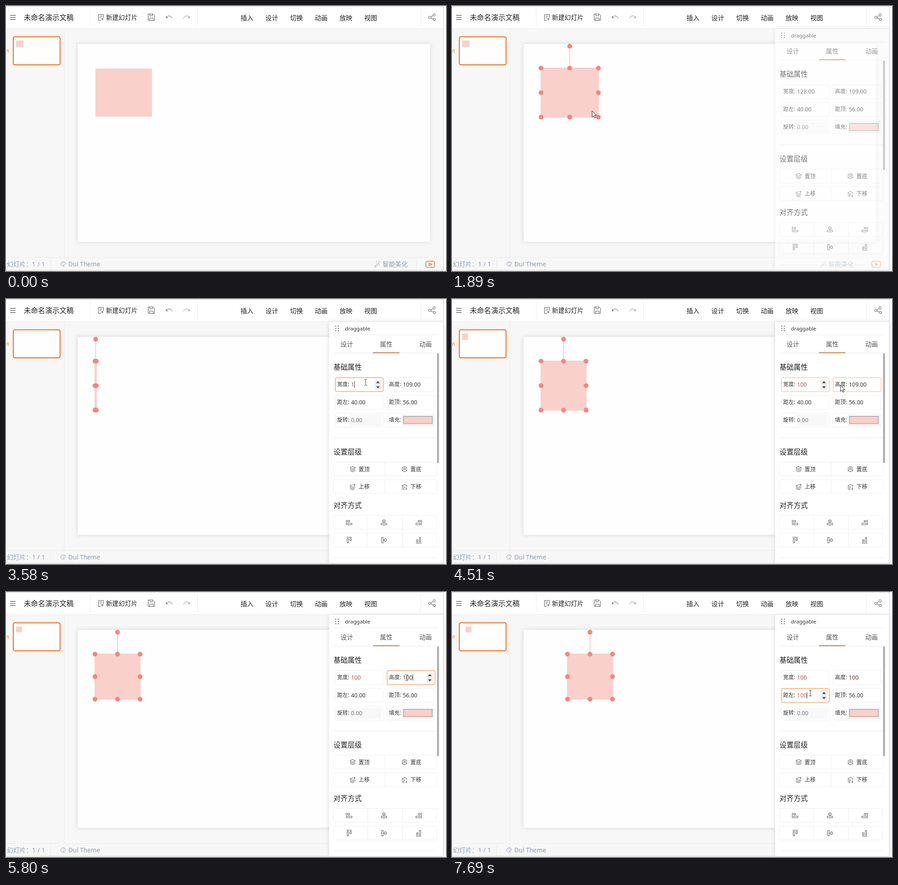
An HTML page that plays this animation: 964 by 581 pixels, repeating every 8000 ms.

```html
<!DOCTYPE html>
<html lang="zh-CN">
<head>
<meta charset="utf-8">
<title>演示文稿</title>
<style>
html, body { margin: 0; width: 100%; height: 100%; overflow: hidden; background: #fff; }
svg { display: block; }
text { font: 14px "Noto Sans", "Noto Sans CJK SC", "Noto Sans CJK", sans-serif; fill: #222; white-space: pre; }
.ic { fill: none; stroke: #555; stroke-width: 1; }
.sep { fill: none; stroke: #ececec; }
.box { fill: #fff; stroke: #efefef; }
.foot { fill: #8f9db3; }
.shade { filter: drop-shadow(0 0 5px rgba(0,0,0,.13)); }
</style>
</head>
<body>
<svg id="stage" width="964" height="581" viewBox="0 0 964 581">
  <rect width="958" height="580" fill="#f7f7f7"/>
  <rect width="958" height="49" fill="#fff"/>
  <path class="sep" d="M0 49.5H958M127.5 50V551M0 551.5H958M184.5 4V45M419.5 4V45M908.5 4V45M97.5 555V577M899.5 555V577"/>

  <g class="ic">
    <path d="M9 20.5H21M9 25H21M9 29.5H21" stroke="#222" stroke-width="1.2"/>
    <path d="M208 31.5H202.500V18.500H213.500V26M205 22H211M205 25H209M208 28.500H214M211 26V31.500" />
    <path d="M311.500 17.500H322L325.500 21V31.500H311.500ZM315 17.500V21.500H321V17.500M314.500 31.500V26.500H322.500V31.500"/>
    <path d="M351 26C354 20 361 20 364 27M351 22V26H355"/>
    <path d="M389 27C392 20 399 20 402 26M402 22V26H398" stroke="#888"/>
    <circle cx="928.500" cy="25" r="2.600"/><circle cx="938" cy="19.500" r="2.600"/><circle cx="938.500" cy="29.500" r="2.600"/>
    <path d="M931 23.700L935.500 21M931 26L936 28.500"/>
  </g>

  <g class="ic" stroke="#8f9db3" style="stroke:#8f9db3">
    <path d="M120 566C120 559 130 559 130.500 565C130.500 568 126 566 126 568.500C127 572 120 571 120 566M123 564H125M126 563H128M125 569L129 571"/>
    <path d="M807 571.500L815.500 563L817 564.500L808.500 573ZM812 559.500V562M817 559V561M819.500 562H817.500M818 567V569"/>
  </g>
  <g class="ic" style="stroke:#f5792a;stroke-width:1.500">
    <rect x="920" y="559.500" width="18.500" height="13.500" rx="2"/>
    <path d="M927 563.500L932.500 566.300L927 569.200Z"/>
  </g>

  <rect class="shade" x="157" y="83" width="772" height="434" fill="#fefefe"/>
  <rect x="16" y="67.500" width="102.500" height="61.500" rx="3.500" fill="#fefefe" stroke="#f2691c" stroke-width="2"/>
  <rect id="thumb" fill="#f9d0ca"/>
  <rect id="shape" fill="#f9d0ca"/>
  <g id="selection" fill="#f5857f">
    <path id="outline" fill="none" stroke="#f5a19b"/>
  </g>
  <g id="panel"></g>
  <path d="M0 .5H958.500V579.500H0" fill="none" stroke="#cfcfcf"/>
  <circle id="ring" r="11" fill="#fbe92a" fill-opacity=".75"/>
  <path id="arrow" d="M0 0V13.500L3.200 10.600L5.400 15.500L7.700 14.500L5.500 9.700H9.800Z" fill="#fff" stroke="#222"/>
  <path id="beam" d="M-3 -6.500H-1L0 -5.500L1 -6.500H3M0 -5.500V5.500M-3 6.500H-1L0 5.500L1 6.500H3" fill="none" stroke="#333"/>
</svg>
<script>
const $ = id => document.getElementById(id);
const stage = $('stage'), panel = $('panel');

function add(parent, tag, attrs, content) {
  const el = document.createElementNS('http://www.w3.org/2000/svg', tag);
  set(el, attrs);
  if (content) el.textContent = content;
  parent.appendChild(el);
  return el;
}
function set(el, attrs) {
  for (const k in attrs) el.setAttribute(k, attrs[k]);
}
const show = (el, on) => el.style.display = on ? '' : 'none';
const label = (parent, x, y, s, size = 14, color = '#222') =>
  add(parent, 'text', { x, y, style: `font-size:${size}px;fill:${color}` }, s);
const rect = (parent, x, y, width, height, attrs) =>
  add(parent, 'rect', { x, y, width, height, ...attrs });
const icon = (x, y, d) => add(panel, 'path', { class: 'ic', d, transform: `translate(${x} ${y})` });
const line = (y, end = 945) => add(panel, 'path', { class: 'sep', d: `M718 ${y}H${end}` });

// Window chrome
const behind = add(stage, 'g', {});
stage.insertBefore(behind, panel);
label(behind, 39, 31, '未命名演示文稿', 15.6);
label(behind, 219, 30, '新建幻灯片', 13.8);
['插入', '设计', '切换', '动画', '放映', '视图'].forEach((s, i) => label(behind, 514 + i * 54.2, 30.5, s, 14));
label(behind, -5, 102.5, '01', 11, '#f2691c');
const gray = '#8f9db3';
label(behind, 2, 571, '幻灯片：', 13.8, gray);
label(behind, 57, 571, '1 / 1', 14, gray);
label(behind, 136.5, 571, 'Dul Theme', 13.7, gray);
label(behind, 825, 571, '智能美化', 13.8, gray);

// Property panel
rect(panel, 708, 50, 250, 529, { fill: '#fff', class: 'shade' });
for (let i = 0; i < 6; i++)
  add(panel, 'circle', { cx: 722.5 + i % 2 * 5.5, cy: 59.5 + (i >> 1) * 5, r: 1.1, fill: '#444' });
label(panel, 742.5, 69, 'draggable', 11.6, '#333');
line(78.5, 948);
['设计', '属性', '动画'].forEach((s, i) => label(panel, 733 + i * 86.3, 104, s, 13.7, '#555'));
line(118.5);
rect(panel, 804, 117, 58, 1.6, { fill: '#c0662c' });
[['基础属性', 155], ['设置层级', 341], ['对齐方式', 458]].forEach(([s, y]) => label(panel, 717.5, y, s, 15.5));

const fields = [
  { name: '宽度', value: '128.00', keys: [3580, 3780, 3910], click: 2980, color: '#a84f46' },
  { name: '高度', value: '109.00', keys: [5400, 5670, 5800], click: 4800, color: '#5a302c' },
  { name: '距左', value: '40.00', keys: [7290, 7560, 7690], click: 6650, color: '#c65d52' },
  { name: '距顶', value: '56.00' },
  { name: '旋转', value: '0.00', off: true },
  { name: '填充' }
];
fields.forEach((f, i) => {
  const x = f.x = 721.5 + i % 2 * 113.5, y = f.y = 172.5 + (i >> 1) * 39;
  f.box = rect(panel, x, y, 105, 30.5, { rx: 3, class: 'box' });
  if (f.off) rect(panel, x + 33, y + 3, 69, 25, { fill: '#f8f8f8' });
  label(panel, x + 4, y + 18.5, f.name + ':', 11.7, '#333');
  if (!f.value) {
    rect(panel, x + 33, y + 3, 70, 25, { fill: '#f1f1f1' });
    rect(panel, x + 36, y + 7, 63, 15.5, { fill: '#f9d0ca', stroke: '#8a8a8a' });
    return;
  }
  f.mark = rect(panel, x + 35, y + 6.5, 0, 16, { fill: '#3390ff' });
  f.text = label(panel, x + 34.5, y + 19, f.value, 12.4, f.off ? '#777' : '#333');
  f.caret = rect(panel, 0, y + 8, 1, 14, { fill: '#333' });
  f.spin = add(panel, 'g', { transform: `translate(${x + 93.5} ${y + 15.5})` });
  rect(f.spin, -7, -11, 14, 22, { fill: '#efefef' });
  add(f.spin, 'path', { d: 'M-4 -3.500L0 -8L4 -3.500ZM-4 3.500L0 8L4 3.500Z', fill: '#444' });
});
line(304.5);

const sheets = 'M-6 -3L0 -6L6 -3L0 0ZM-6 0L0 3L6 0M-6 3L0 6L6 3';
const flipped = 'M-6 3L0 6L6 3L0 0ZM-6 0L0 -3L6 0M-6 -3L0 -6L6 -3';
const layers = [
  ['置顶', sheets], ['置底', flipped],
  ['上移', 'M1 -5L-6 -2L0 1L4 -1M-6 1L0 4L6 1M-6 4L0 6.500L4 5M4 -1V-6M2 -4L4 -6L6 -4'],
  ['下移', 'M4 -1L6 -2L0 -5.500L-6 -2L0 1L2 0M-6 1L0 4M-6 4L0 6.500M4 1V6M2 4L4 6L6 4']
];
const aligns = [
  'M-6.500 -6V6M-4 -4.500H1V-1.500H-4ZM-4 1.500H6V5H-4Z',
  'M0 -6.500V-5M0 -1.500V1.500M0 5V6.500M-3 -5H3V-1.500H-3ZM-6 1.500H6V5H-6Z',
  'M6.500 -6V6M4 -4.500H-1V-1.500H4ZM4 1.500H-6V5H4Z',
  'M-6 -6.500H6M-4.500 -4H-1.500V6H-4.500ZM1.500 -4H4.500V1H1.500Z',
  'M-6.500 0H-5M-1.500 0H1.500M5 0H6.500M-5 -6H-1.500V6H-5ZM1.500 -3H5V3H1.500Z',
  'M-6 6.500H6M-4.500 4H-1.500V-1H-4.500ZM1.500 4H4.500V-6H1.500Z'
];
for (let row = 0; row < 2; row++) {
  const y = row * 38.8;
  rect(panel, 717.5, 357.5 + y, 226.5, 30.5, { rx: 3, class: 'box' });
  rect(panel, 717.5, 474.5 + y, 226, 30.5, { rx: 3, class: 'box' });
  add(panel, 'path', { class: 'sep', d: `M830.5 ${358 + y}v30M792.5 ${475 + y}v30M868.5 ${475 + y}v30` });
  for (let col = 0; col < 2; col++) {
    const [name, d] = layers[row * 2 + col];
    icon(759.5 + col * 113.5, 373 + y, d);
    label(panel, 772.5 + col * 113.5, 377.5 + y, name, 12, '#333');
  }
  for (let col = 0; col < 3; col++) icon(752 + col * 76, 490 + y, aligns[row * 3 + col]);
}
line(567.5);
rect(panel, 944.5, 119, 4, 241, { rx: 2, fill: '#a8a8a8' });

const handles = Array.from({ length: 9 }, () => add($('selection'), 'circle', { r: 5.2 }));

// Pointer path: time, x, y
const path = [
  [130, 889, 565], [300, 650, 420], [480, 400, 275], [680, 287, 217], [950, 287, 217], [1150, 307, 230],
  [2030, 307, 230], [2250, 470, 236], [2500, 682, 230], [2640, 750, 228], [2720, 785, 215], [2840, 801, 184],
  [2960, 788, 182], [4310, 788, 184], [4510, 851, 189], [4680, 878, 188], [6270, 878, 188],
  [6420, 835, 200], [6600, 785, 221.5]
];
function pointer(t) {
  let i = path.findIndex(p => p[0] > t);
  if (i < 0) i = path.length;
  if (i === 0 || i === path.length) return path[i ? i - 1 : 0].slice(1);
  const [a, x, y] = path[i - 1], [b, u, v] = path[i], k = (t - a) / (b - a);
  return [x + (u - x) * k, y + (v - y) * k];
}
const over = (f, [x, y]) => x > f.x && x < f.x + 105 && y > f.y && y < f.y + 30;
const rings = [[680, 950], [2980, 3190], [4800, 5070], [6650, 6960]];

function drawField(f, t, pos) {
  if (!f.value) return;
  const typed = f.keys ? f.keys.filter(k => t >= k).length : 0;
  const active = t >= f.click && !fields.some(g => g.click > f.click && t >= g.click);
  const hover = t > 2500 && over(f, pos), left = t > 2640 && over(f, pointer(t - 150));
  const border = active && hover ? '#f17f2c' : active || hover ? '#f7b184' : left ? '#fbd6bd' : '#efefef';
  f.now = typed ? '100'.slice(0, typed) : f.value;
  f.text.textContent = f.now;
  f.box.style.stroke = border;
  show(f.spin, !f.off && (active || hover && pos[0] > f.x + 33));

  const selected = active && !typed && t >= f.click + 140;
  f.text.style.fill = selected ? '#fff' : typed ? f.color : f.off ? '#777' : '#333';
  const width = f.text.getComputedTextLength();
  show(f.mark, selected);
  f.mark.setAttribute('width', width);
  const last = typed ? f.keys[typed - 1] : f.click;
  show(f.caret, active && !selected && (t - last) % 1060 < 530);
  f.caret.setAttribute('x', f.x + 34.5 + width - (typed ? 0 : 7));
}

function drawShape(t) {
  const [w, h, left, top] = fields.map(f => +f.now);
  const place = (el, x, y, s) => set(el, { x: x + left * s, y: y + top * s, width: w * s, height: h * s });
  place($('thumb'), 17, 68.5, .1285);
  const s = .967;
  place($('shape'), 157.3, 83, s);
  const x = 156.3 + left * s, y = 82 + top * s, dx = w * s / 2 + 1, dy = h * s / 2 + 1;
  show($('selection'), t >= 750);
  $('outline').setAttribute('d', `M${x} ${y}h${2 * dx}v${2 * dy}h${-2 * dx}ZM${x + dx} ${y}V88`);
  handles.forEach((el, i) => set(el, i === 4
    ? { cx: x + dx, cy: 88 }
    : { cx: x + i % 3 * dx, cy: y + Math.floor(i / 3) * dy }));
}

function draw(now) {
  const t = now % 8000, pos = pointer(t);
  const alpha = t < 1750 ? 0 : Math.min(1, (t - 1680) / 350);
  panel.style.opacity = alpha;
  fields.forEach(f => drawField(f, t, pos));
  drawShape(t);

  const beam = alpha === 1 && fields.some(f => f.value && !f.off && over(f, pos) && pos[0] > f.x + 33);
  show($('beam'), beam);
  show($('arrow'), !beam && t >= 130);
  show($('ring'), rings.some(([a, b]) => t >= a && t < b));
  for (const id of ['beam', 'arrow', 'ring']) $(id).setAttribute('transform', `translate(${pos})`);
  requestAnimationFrame(draw);
}
requestAnimationFrame(draw);
</script>
</body>
</html>
```
